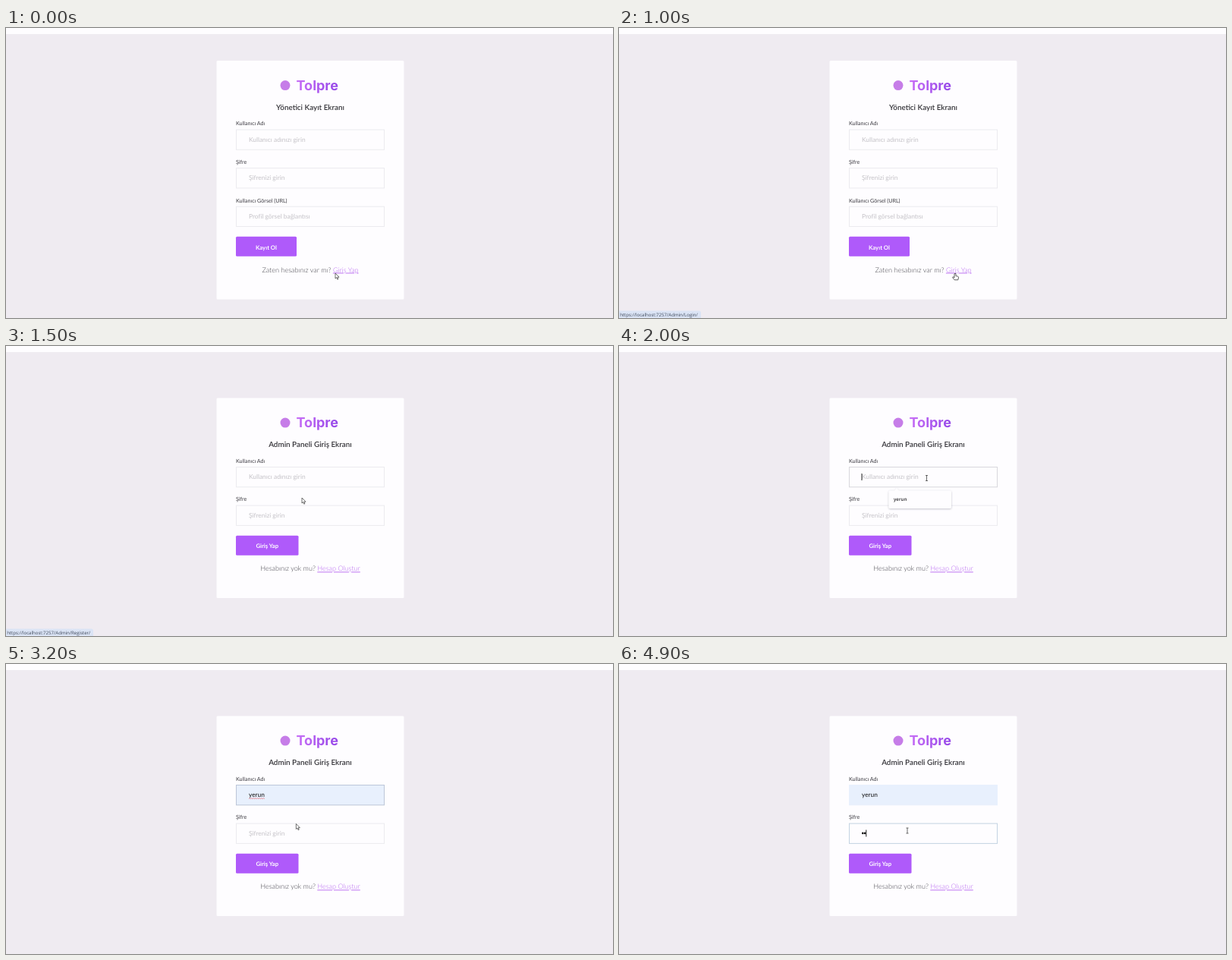
Animation, 800 px wide and 382 px high, one loop 5000 ms. Source, as an HTML page:

```html
<!DOCTYPE html>
<html lang="tr">
<head>
<meta charset="utf-8">
<title>Yönetici Kayıt Ekranı</title>
<style>
  html, body { margin: 0; width: 100%; height: 100%; overflow: hidden; background: #efebf1; }
  svg { display: block; width: 100vw; height: 100vh; }
  text { font-family: Lato, "Open Sans", sans-serif; text-rendering: geometricPrecision; white-space: pre; }
  .brand { font: 700 18px Inter, sans-serif; fill: url(#violet); }
  .head { font-size: 9.9px; font-weight: 600; fill: #343338; text-anchor: middle; }
  .label { font-size: 7.15px; fill: #3b3a40; }
  .hint { font-size: 8.38px; fill: #c4c2c7; }
  .value { font-size: 8.3px; fill: #111; }
  .go { font-size: 7.7px; font-weight: 700; fill: #fff; text-anchor: middle; }
  .foot { font-size: 9.1px; font-weight: 300; fill: #45434a; text-anchor: middle; }
  .foot tspan { fill: #b868f0; text-decoration: underline; }
  .small { font: 600 6.2px "Open Sans", sans-serif; fill: #2b2a2e; }
  .status { font: 6.1px "Open Sans", sans-serif; fill: #3c4658; }
  .box { fill: #fefdff; stroke: #ecebef; stroke-width: 1; }
  .caret { stroke: #222; stroke-width: 1; }
</style>
</head>
<body>
<svg viewBox="0 0 800 382" preserveAspectRatio="none">
  <defs>
    <linearGradient id="violet"><stop offset="0" stop-color="#c870f6"/><stop offset="1" stop-color="#9546e8"/></linearGradient>
    <filter id="shade" x="-20%" y="-40%" width="140%" height="200%">
      <feDropShadow dx="0" dy="0.8" stdDeviation="1" flood-color="#445" flood-opacity="0.35"/>
    </filter>
  </defs>
  <rect width="800" height="382" fill="#efebf1"/>
  <rect width="800" height="8" fill="#fefdff"/>
  <g id="signup"></g>
  <g id="login"></g>

  <g id="user">
    <text class="value" x="320" y="175">yerun</text>
    <path id="wave" d="M320 177.6l1.3-1 1.3 1 1.3-1 1.3 1 1.3-1 1.3 1 1.3-1 1.3 1 1.3-1 1.3 1 1.3-1 1.3 1 1.3-1 1.3 1 1.3-1 1.3 1" fill="none" stroke="#e2474f" stroke-width=".6"/>
  </g>
  <circle id="dot0" cx="321.3" cy="222.9" r="1.3" fill="#111"/>
  <circle id="dot1" cx="324.1" cy="222.9" r="1.3" fill="#111"/>
  <path id="caret" class="caret" d="M0-4.5V4.5"/>

  <g id="list">
    <g filter="url(#shade)">
      <path d="M357 190.5H363L366 187.5 369 190.5H436Q438 190.5 438 192.5V212Q438 214 436 214H357.500Q355.500 214 355.500 212V192.500Q355.500 190.500 357 190.500Z" fill="#fefdff"/>
    </g>
    <g id="hover">
      <rect x="358.500" y="193.500" width="76" height="17.500" rx="1" fill="#efeef1"/>
      <path d="M423.500 199.700l4.600 4.600m0-4.600l-4.600 4.600" stroke="#555" stroke-width=".8"/>
    </g>
    <text class="small" x="362" y="204.300">yerun</text>
  </g>

  <g id="status">
    <path id="bar" fill="#dbe4f5"/>
    <text id="url" class="status" x="1.200" y="380.300"></text>
  </g>

  <g id="arrow"><path d="M0 0V7L1.600 5.600 2.800 8.200 3.900 7.700 2.800 5.200H5Z" fill="#fff" stroke="#333" stroke-width=".7"/></g>
  <g id="hand"><path d="M-1 .8Q0-.6 1 .8V3.600L3.600 4.200Q4.600 4.500 4.500 5.700L3.800 8.800H-.8L-3.300 5.800Q-3.500 4.600-2.200 4.900L-1 5.800Z" fill="#fff" stroke="#333" stroke-width=".8" stroke-linejoin="round"/></g>
  <g id="beam"><path d="M-1.500-3.500H1.500M0-3.500V3.500M-1.500 3.500H1.500" stroke="#444" stroke-width=".8"/></g>
</svg>
<script>
const $ = id => document.getElementById(id);
const show = (id, on) => { $(id).style.display = on ? '' : 'none'; };
const PITCH = 50.6;

// One card; every part is placed from its top edge.
function card({ top, height, title, fields, go, goWidth, ask, link }) {
  const rows = fields.map(([label, hint], i) => {
    const y = top + i * PITCH;
    return `<text class="label" x="303" y="${y + 85.3}">${label}</text>
      <rect class="box" x="303.5" y="${y + 91}" width="195" height="26.3"/>
      <text class="hint" x="320" y="${y + 106.5}">${hint}</text>`;
  }).join('');
  const end = top + fields.length * PITCH;
  return `<rect x="277.5" y="${top}" width="247" height="${height}" rx="1.5" fill="#fefdff"/>
    <circle cx="368" cy="${top + 32.6}" r="6.5" fill="#c67de8"/>
    <text class="brand" x="382.5" y="${top + 38.6}">Tolpre</text>
    <text class="head" x="401" y="${top + 64.5}">${title}</text>${rows}
    <rect x="303" y="${end + 80}" width="${goWidth}" height="26" rx="1.5" fill="#af5afa"/>
    <text class="go" x="${303 + goWidth / 2}" y="${end + 96.7}">${go}</text>
    <text class="foot" x="401" y="${end + 126.7}">${ask} <tspan>${link}</tspan></text>`;
}

const name = ['Kullanıcı Adı', 'Kullanıcı adınızı girin'];
const pass = ['Şifre', 'Şifrenizi girin'];
$('signup').innerHTML = card({
  top: 43, height: 314.5, title: 'Yönetici Kayıt Ekranı',
  fields: [name, pass, ['Kullanıcı Görsel (URL)', 'Profil görsel bağlantısı']],
  go: 'Kayıt Ol', goWidth: 80, ask: 'Zaten hesabınız var mı?', link: 'Giriş Yap'
});
$('login').innerHTML = card({
  top: 68.5, height: 263.5, title: 'Admin Paneli Giriş Ekranı',
  fields: [name, pass],
  go: 'Giriş Yap', goWidth: 82.5, ask: 'Hesabınız yok mu?', link: 'Hesap Oluştur'
});
const boxes = $('login').querySelectorAll('.box');
const hints = $('login').querySelectorAll('.hint');

const path = [
  [0, 434, 323], [300, 443, 323], [1100, 443, 323], [1300, 430, 290], [1500, 390, 200],
  [1800, 405.5, 174], [2100, 405.5, 174], [2400, 388, 203], [2700, 383.5, 206],
  [3100, 383.5, 206], [3400, 380, 219.5], [5000, 380, 219.5]
];
const pointers = [[0, 'arrow'], [200, 'hand'], [1400, 'arrow'], [1700, 'beam'], [2300, 'arrow'], [3300, 'beam']];
const urls = [[0, ''], [400, 'Login'], [1300, 'Register'], [1800, '']];
const carets = [
  [0, null], [1900, [320, 172.5]], [2400, null], [2600, [340.4, 172.5]], [3100, null],
  [3300, [320, 223]], [3800, null], [4300, [320, 223]], [4700, [323, 223]], [4900, [325.8, 223]]
];
const borders = [
  ['#ecebef', [1900, '#d8d7dc'], [2400, '#bcc6d8'], [3300, '#e8f0fd']],
  ['#ecebef', [3300, '#c3d3e2']]
];

const at = (steps, t) => steps.filter(s => s[0] <= t).pop()[1];

function place(t) {
  const i = path.findIndex(p => p[0] > t);
  const [a, b] = [path[i - 1], path[i]];
  const k = (t - a[0]) / (b[0] - a[0]);
  return [a[1] + (b[1] - a[1]) * k, a[2] + (b[2] - a[2]) * k];
}

function draw(t) {
  show('signup', t < 1100);
  show('login', t >= 1100);

  const filled = t >= 2400;
  const dots = t >= 4900 ? 2 : t >= 4700 ? 1 : 0;
  show('user', filled);
  show('wave', t >= 2600 && t < 3300);
  show('dot0', dots > 0);
  show('dot1', dots > 1);
  boxes[0].style.fill = filled ? '#e8f0fd' : '';
  hints[0].style.display = filled ? 'none' : '';
  hints[1].style.display = dots ? 'none' : '';
  borders.forEach(([base, ...steps], i) => {
    boxes[i].style.stroke = at([[0, base], ...steps], t);
  });

  const caret = at(carets, t);
  show('caret', caret);
  if (caret) $('caret').setAttribute('transform', `translate(${caret})`);

  show('list', t >= 1900 && t < 2900);
  show('hover', filled);
  $('list').style.opacity = t < 2700 ? 1 : t < 2800 ? 0.65 : 0.25;

  const page = at(urls, t);
  show('status', page);
  if (page) {
    const w = page === 'Login' ? 108 : 115;
    $('bar').setAttribute('d', `M0 372.5H${w - 2.5}Q${w} 372.5 ${w} 375V382H0Z`);
    $('url').textContent = `https://localhost:7257/Admin/${page}/`;
  }

  const kind = at(pointers, t);
  for (const id of ['arrow', 'hand', 'beam']) show(id, id === kind);
  $(kind).setAttribute('transform', `translate(${place(t)})`);
}

// The screen refreshes ten times a second.
function tick() {
  draw(Math.floor(performance.now() / 100) * 100 % 5000);
  requestAnimationFrame(tick);
}
tick();
</script>
</body>
</html>
```
